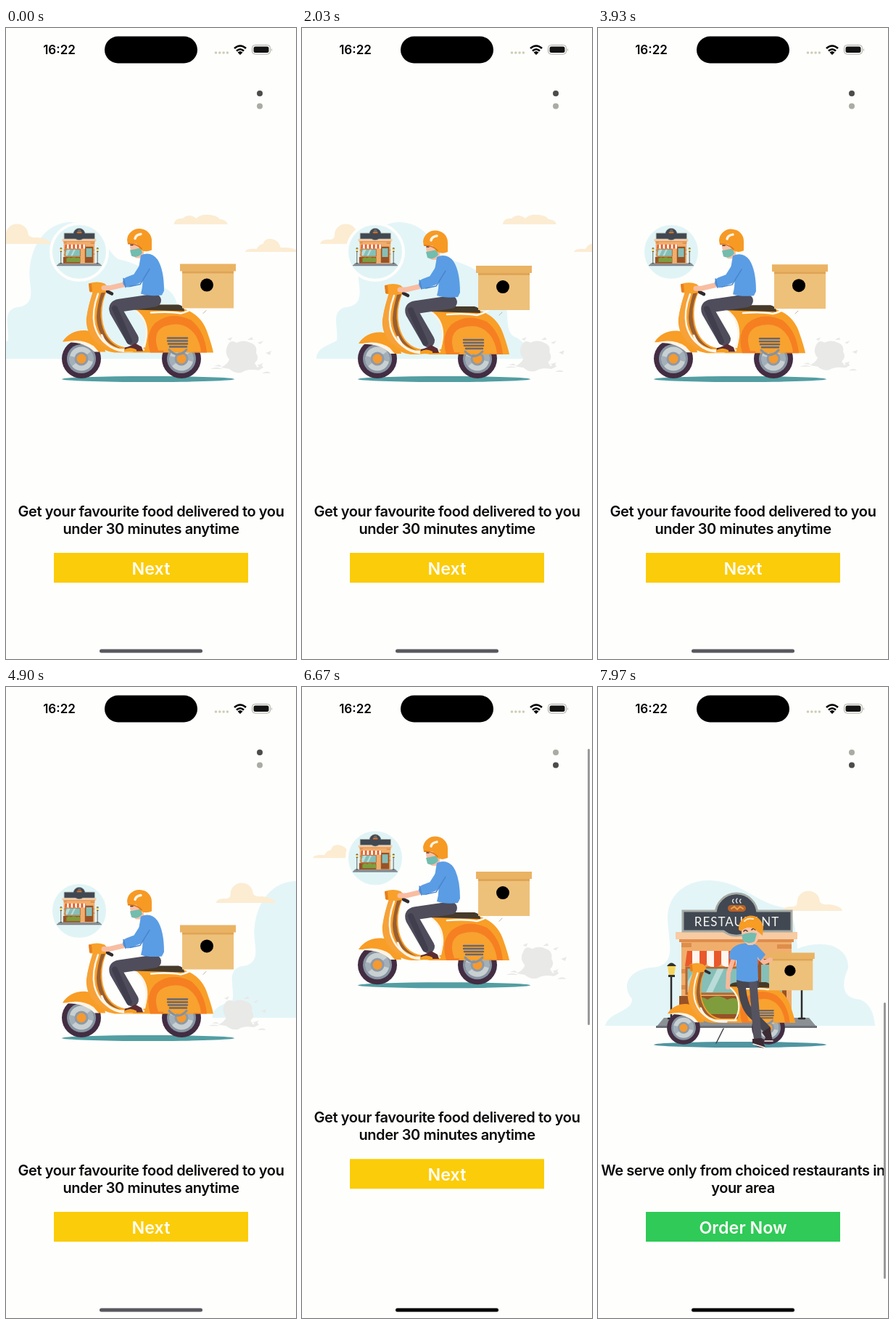
Animation of 400 by 868 pixels, one loop 8000 ms. Source, as an HTML page:

```html
<!DOCTYPE html>
<html lang="en">
<head>
<meta charset="utf-8">
<title>Food delivery onboarding</title>
<style>
  html, body { margin: 0; width: 100%; height: 100%; overflow: hidden; background: #fefefd; }
  svg { display: block; width: 100vw; height: 100vh; }
  text { font-family: Inter, "Open Sans", sans-serif; text-anchor: middle; }
  .caption { font-size: 20px; font-weight: 600; letter-spacing: -.4px; fill: #0a0a0a; }
  .button { font-size: 23.3px; font-weight: 600; fill: #fffdf8; }
  .cloud { fill: #fcecd2; }
  .hill { fill: #e3f5f7; }
  .line { fill: none; stroke-linecap: round; stroke-linejoin: round; }
</style>
</head>
<body>
<svg viewBox="0 0 400 868">
  <defs>
    <path id="cloudA" class="cloud" d="M-35 297Q-34 291-24 291Q-15 292-15 285A15.500 15 0 0 1 16 284Q18 289 28 288Q46 290 47 297Z"/>
    <path id="cloudB" class="cloud" d="M217 270Q218 261 229 262Q238 254 248 262Q253 256 266 257Q277 258 280 263Q290 264 291 270Z"/>
    <path id="cloudC" class="cloud" d="M315 308Q317 303 331 304Q335 297 340 297Q342 289 351 290Q361 291 364 302Q385 301 387 308Z"/>

    <pattern id="awning" x="120" width="20" height="30" patternUnits="userSpaceOnUse">
      <rect width="20" height="30" fill="#fff6ee"/><rect width="10" height="30" fill="#e8592c"/>
    </pattern>

    <g id="lamp">
      <path class="line" stroke="#2b2b2b" stroke-width="2.500" d="M101 398V456M97 456H105"/>
      <path fill="#f6d45a" d="M96 384H107L105 397H98Z"/>
      <path fill="#33322e" d="M95 384Q101 375 108 384ZM97 396H106V399H97Z"/>
    </g>

    <g id="store">
      <path fill="#8b9095" d="M91 455H291L302 468H80Z"/>
      <path fill="#6b7078" d="M80 466H302V469H80Z"/>
      <path fill="#f0ae6c" d="M115 346H267V456H115Z"/>
      <path fill="#de8d4c" d="M115 352h14v6h-14zM247 354h20v6h-20zM115 388h7v6h-7zM256 388h11v6h-11zM247 408h20v6h-20zM115 410h9v6h-9z"/>
      <path fill="#985225" d="M219 374H260V454H219ZM112 425H196V456H112Z"/>
      <path fill="#86bfb8" d="M225 382H254V425H225ZM122 386H196V422H122Z"/>
      <path fill="#b9dcd8" d="M134 387H148L133 420H122V408ZM165 387H174L158 420H149Z"/>
      <path fill="none" stroke="#b26831" stroke-width="3" d="M122 386H196V422H122Z"/>
      <path fill="#7f9d3c" d="M128 450V432Q140 422 151 430Q165 421 178 430Q192 424 196 436V450Z"/>
      <path fill="url(#awning)" d="M123 363H222V378Q222 385 215 385Q210 385 210 379Q210 385 200 385Q190 385 190 379Q190 385 180 385Q170 385 170 379Q170 385 160 385Q150 385 150 379Q150 385 140 385Q130 385 130 379Q129 385 120 384Z"/>
      <path fill="#f8cba2" d="M107 337H275V347H107Z"/>
      <path fill="#df8c4c" d="M112 347H270V351H112Z"/>
      <g fill="#414852" stroke="#a5aaa4" stroke-width="3">
        <circle cx="191" cy="313" r="29"/>
        <path d="M117 308H267V336H117Z"/>
      </g>
      <circle cx="191" cy="313" r="27.500" fill="#414852"/>
      <path d="M119 310H265V334H119Z" fill="#414852"/>
      <rect x="179" y="300" width="25" height="9" rx="4.500" fill="#b9622b"/>
      <path class="line" stroke="#e9a24a" stroke-width="2" d="M184 305L188 302L192 306L196 302L200 305"/>
      <path class="line" stroke="#eee" stroke-width="1.300" d="M187 297q-3-3 0-5M192 297q-3-3 0-6M197 297q-3-3 0-5"/>
      <use href="#lamp"/><use href="#lamp" x="180"/>
    </g>

    <g id="wheel">
      <circle r="27" fill="#432d42"/>
      <circle r="20" fill="#8794a2"/>
      <circle r="16.500" fill="#c9d0d2"/>
      <path fill="#a3afb8" d="M0 0L-13 10A16.500 16.500 0 0 1-16 -4ZM0 0L13-10A16.500 16.500 0 0 1 16 4Z"/>
      <circle r="9.500" fill="#8f9aa6"/>
      <circle r="6.500" fill="#f59a30"/>
    </g>
    <g id="wheels">
      <use href="#wheel" x="104" y="455"/>
      <use href="#wheel" x="242" y="455"/>
    </g>

    <g id="scooter">
      <path fill="#f89d26" d="M78 432C88 415 113 411 128 424Q136 434 137 446H127Q116 431 98 432Z"/>
      <path fill="#fff4e4" d="M78 433Q104 426 121 438L128 446H122Q107 431 78 433Z"/>
      <path fill="#f89f28" d="M120 362L139 362Q129 385 134 408Q141 436 165 440H192Q198 419 186 395Q180 390 178 387H246Q270 395 278 420Q284 437 286 447H150C125 444 109 421 111 399Q113 385 120 362Z"/>
      <path fill="#7a4a36" d="M131 365L137 364Q127 386 132 408Q138 433 158 441C135 436 125 417 125 397Q126 382 131 365Z" opacity=".75"/>
      <path fill="#f6a238" d="M120 365L129 364Q119 389 123 408Q128 430 147 442Q116 437 112 408Q110 390 120 365Z"/>
      <path class="line" stroke="#fff5e8" stroke-width="2.500" d="M127 366Q118 390 122 409Q129 436 156 443H190"/>
      <path class="line" stroke="#fff5e8" stroke-width="3" d="M132 423Q141 447 174 445"/>
      <path class="line" stroke="#fff5e8" stroke-width="2.500" d="M180 390Q194 401 194 420Q194 432 188 441"/>
      <path fill="#f67f22" d="M199 447Q191 421 206 406Q227 389 255 402Q274 417 277 447H259Q256 418 235 416Q217 418 217 447Z"/>
      <path fill="#f8a230" d="M210 444Q201 419 218 411Q247 401 262 424Q268 435 269 446Z"/>
      <path class="line" stroke="#68686f" stroke-width="2.500" d="M223 427H250M223 431H250M224 435H250M226 439H249"/>
      <path class="line" stroke="#8492a2" stroke-width="3" d="M225 443Q237 456 249 443"/>
      <path class="line" stroke="#fffaf4" stroke-width="2.500" d="M200 392Q226 390 241 393Q253 390 258 385"/>
      <path fill="#463a2a" d="M177 388Q181 380 196 381H238Q246 383 246 390Z"/>
      <path fill="#f8a02a" d="M114 352Q126 348 136 352L141 357L138 364H116Z"/>
      <path fill="#e87f1c" d="M114 352H118L119 363H115Z"/>
      <path class="line" stroke="#312b2e" stroke-width="4.500" d="M140 363L146 366"/>
    </g>

    <g id="box">
      <path fill="#eec17a" d="M243 333H314V386H243Z"/>
      <path fill="#dfa457" d="M243 335H314V338H243Z"/>
      <path fill="#eab363" d="M240 325H317V335H240Z"/>
      <circle cx="277" cy="354" r="9"/>
      <path class="line" stroke="#c9b090" d="M276 389L272 393"/>
    </g>

    <g id="helmet">
      <path fill="#f69a24" d="M-17-2A17 16 0 0 1 17-1V12Q8 16 1 11L-4 3L-16 4Z"/>
      <path class="line" stroke="#fff4e4" stroke-width="3.500" d="M2-10Q-5-9-6-4"/>
      <path class="line" stroke="#d97320" stroke-width="1.500" d="M-15 3Q-4 3 3 10"/>
    </g>

    <g id="rider">
      <path fill="#fac0a6" d="M171 296H190V317H179Q170 309 171 296Z"/>
      <path class="line" stroke="#4f4d5b" stroke-width="18" d="M205 375L157 382Q149 383 152 390L174 428"/>
      <path class="line" stroke="#413f4d" stroke-width="8" d="M150 386L170 431"/>
      <path fill="#5a2c34" d="M164 440Q173 438 178 434L187 439L189 445H163Z"/>
      <path fill="#f6a021" d="M163 443Q172 438 180 443V446H163Z"/>
      <path fill="#5a9de4" d="M186 313Q200 307 209 319Q218 333 218 362L215 368Q198 370 186 366Q192 344 183 331Z"/>
      <path class="line" stroke="#f8bda2" stroke-width="7" d="M164 353L143 358L135 358"/>
      <path class="line" stroke="#5a9de4" stroke-width="14" d="M195 323L181 345L168 350"/>
      <path class="line" stroke="#4a84cc" stroke-width="1.500" d="M198 332L185 353L171 356M162 345L165 357"/>
      <path fill="#72bdae" d="M171 306L186 303L188 310Q181 318 173 314Z"/>
      <path class="line" stroke="#4a342b" stroke-width="1.500" d="M172 299h3"/>
      <use href="#helmet" x="184" y="294"/>
    </g>

    <g id="server">
      <path class="line" stroke="#f7b89c" stroke-width="6" d="M187 374L180 393L179 413"/>
      <path fill="#48464f" d="M191 402H222V414H192Z"/>
      <path class="line" stroke="#48464f" stroke-width="11" d="M198 408Q200 438 211 449L233 471"/>
      <path class="line" stroke="#55535f" stroke-width="11" d="M214 408L217 445L220 481"/>
      <path fill="#3d2b34" d="M213 484L225 483L231 496Q222 498 213 490ZM226 475L237 468L241 487H229L231 482Z"/>
      <path class="line" stroke="#fff5ec" stroke-width="1.500" d="M214 491L230 496M230 487H241"/>
      <path class="line" stroke="#f7b89c" stroke-width="6" d="M221 371L229 379L238 375"/>
      <path fill="#5a9de4" d="M190 356Q204 349 219 355L231 368L224 377L220 371L221 404Q207 408 191 403V376L181 374Q180 361 190 356Z"/>
      <path fill="#f9c3a8" d="M198 330H222V342Q221 352 213 355H207Q199 350 198 339Z"/>
      <path fill="#72bdae" d="M198 341Q209 336 219 339L216 350Q207 355 200 349Z"/>
      <path class="line" stroke="#493428" stroke-width="1.500" d="M201 336q2-3 5 0M212 334q2-3 5 0M201 331l4-1M212 329l4 0"/>
      <path fill="#f79c24" d="M194 334A17 18 0 0 1 228 331L227 342L221 337Q209 325 197 336Z"/>
      <path class="line" stroke="#ffe5c0" stroke-width="2" d="M202 322Q207 317 214 319"/>
    </g>
  </defs>

  <rect width="400" height="868" fill="#fefefd"/>

  <g id="pages">
    <g>
      <g id="scenery"></g>
      <circle cx="101" cy="308" r="39" fill="#e1f4f5" stroke="#fefefd" stroke-width="4"/>
      <use href="#store" transform="translate(47.500 196) scale(.28)"/>
      <ellipse cx="196" cy="483" rx="119" ry="4" fill="#539ea2"/>
      <g id="smoke" fill="#e9e9e8">
        <path d="M306 436Q310 428 318 433Q328 428 337 433Q347 436 345 447Q350 455 343 461L349 471Q333 468 325 474Q316 476 308 469L297 467Q306 462 308 456Q300 447 306 436Z"/>
        <path d="M282 469q8-4 17 0zM287 465l7-2 4 3zM343 470l9-7 3 4 -5 3zM353 475q8-5 12 0zM346 464l9 -3 -4 5zM358 447l8-3-2 6zM347 433l8-3-4 5zM305 428l7-3-2 5zM333 429l6-4 2 4z"/>
      </g>
      <use href="#wheels"/>
      <g id="ride">
        <use href="#scooter"/><use href="#box"/><use href="#rider"/>
      </g>
      <text class="caption" x="200" y="672">Get your favourite food delivered to you</text>
      <text class="caption" x="200" y="696">under 30 minutes anytime</text>
      <path fill="#fbcc09" d="M66 722H334V763H66Z"/>
      <text class="button" x="200" y="752">Next</text>
    </g>

    <g transform="translate(0 868)">
      <path class="hill" d="M10 466C14 447 48 447 47 429C31 411 43 389 73 386C111 384 97 352 96 318C96 283 125 265 155 266C202 269 214 296 258 304Q272 310 275 360Q300 350 323 356Q346 365 345 387C334 411 338 429 362 430Q380 438 382 466Z"/>
      <g id="clouds">
        <use id="cloudLow" href="#cloudA"/>
        <g id="cloudPair"><use href="#cloudB" x="-221" y="-16"/><use href="#cloudC" x="-257"/></g>
      </g>
      <use href="#store"/>
      <text x="191.500" y="329" fill="#f6f6f2" style="font-family:Lato,sans-serif;font-size:17px;letter-spacing:1px">RESTAURANT</text>
      <ellipse cx="196" cy="492" rx="119" ry="4" fill="#4f95a0"/>
      <path class="line" stroke="#484349" stroke-width="1.500" d="M173 470L163 490"/>
      <g transform="translate(29.800 83) scale(.848)"><use href="#wheels"/><use href="#scooter"/></g>
      <use href="#box" transform="translate(30 90) scale(.848)"/>
      <use href="#server"/>
      <text class="caption" x="200" y="672">We serve only from choiced restaurants in</text>
      <text class="caption" x="200" y="696">your area</text>
      <path fill="#2fca58" d="M66 722H334V763H66Z"/>
      <text class="button" x="200" y="752">Order Now</text>
    </g>
  </g>

  <text x="73.500" y="36" style="font-size:17px;font-weight:600">16:22</text>
  <rect x="136" y="11.500" width="128" height="37" rx="18.500"/>
  <g fill="#cfccb4">
    <circle cx="289.500" cy="34" r="1.800"/><circle cx="294.800" cy="34" r="1.800"/>
    <circle cx="300.100" cy="34" r="1.800"/><circle cx="305.400" cy="34" r="1.800"/>
  </g>
  <path class="line" stroke="#000" stroke-width="2.600" style="stroke-linecap:butt" d="M315 28Q323 21 331 28M318 31.500Q323 27 328 31.500"/>
  <path d="M319.500 33.500Q323 30.500 326.500 33.500L323 37Z"/>
  <rect x="339.500" y="23.500" width="25" height="12.500" rx="4" fill="none" stroke="#a9a99e"/>
  <rect x="341.500" y="25.500" width="21" height="8.500" rx="2.500" fill="#141414"/>
  <path d="M366 28Q368 30 366 32Z" fill="#a9a99e"/>
  <circle id="dot0" cx="350" cy="90" r="4"/><circle id="dot1" cx="350" cy="107.500" r="4"/>
  <rect id="bar" x="394" width="3" height="380" rx="1.500" fill="#999"/>
  <rect id="home" x="129" y="854.500" width="142" height="5" rx="2.500"/>
</svg>

<script>
const $ = id => document.getElementById(id);
const move = (node, x, y) => node.setAttribute('transform', `translate(${x} ${y})`);
const clamp01 = v => Math.min(1, Math.max(0, v));
const smooth = (t, from, to) => { const s = clamp01((t - from) / (to - from)); return s * s * (3 - 2 * s); };
const TAU = 2 * Math.PI, LOOP = 8, PAGE = 868, SPEED = 353;

// Each pass of hill and clouds: x position at a known second.
const passes = [[15, 0], [378, 1.13], [325, 4.9]];
const passNodes = passes.map(() => {
  const g = document.createElementNS('http://www.w3.org/2000/svg', 'g');
  g.innerHTML = `<path class="hill" transform="translate(-12 0)" d="M-28 455C-28 440-12 437 0 430C3 414-10 387 14 384C43 379 27 352 30 332C33 295 55 267 88 267C129 270 132 303 152 318C183 325 204 337 217 358C248 374 224 418 248 426Q263 434 266 455Z"/>
    <use href="#cloudA"/><use href="#cloudB"/><use href="#cloudC"/>`;
  return $('scenery').appendChild(g);
});

function draw(t) {
  passes.forEach(([x, at], i) => {
    const px = x - SPEED * (t - at);
    passNodes[i].setAttribute('visibility', px > -430 && px < 450 ? 'visible' : 'hidden');
    move(passNodes[i], px, 0);
  });

  move($('ride'), 0, 0.4 - 2 * Math.cos(TAU * (t - 2.93) / 0.565));
  const puff = (1 - Math.cos(TAU * t / 0.733)) / 2;
  $('smoke').setAttribute('transform',
    `translate(${-5 * puff} ${-4 * puff}) translate(290 470) scale(${1 - .06 * puff} ${1 - .1 * puff}) translate(-290 -470)`);

  const firstVisit = t < 7.1;
  move($('clouds'), -150 * (t - (firstVisit ? 6.07 : 7.97)), 0);
  move($('cloudLow'), firstVisit ? -10 : 290, 11);
  $('cloudPair').setAttribute('visibility', firstVisit ? 'visible' : 'hidden');

  const scroll = PAGE * (smooth(t, 5.25, 5.8) - smooth(t, 6.2, 6.773) + smooth(t, 7.52, 7.93));
  move($('pages'), 0, -scroll);
  $('bar').setAttribute('y', 53 + 0.439 * scroll);
  $('bar').setAttribute('opacity', smooth(t, 5.2, 5.3) - smooth(t, 7.1, 7.35) + smooth(t, 7.48, 7.56));

  const second = (t > 5.78 && t < 6.78) || t > 7.9;
  $('dot0').setAttribute('fill', second ? '#ababa4' : '#4c4c4a');
  $('dot1').setAttribute('fill', second ? '#4c4c4a' : '#ababa4');
  $('home').setAttribute('fill', t < 6.25 ? '#59585e' : '#000');
}

const start = performance.now();
(function tick() {
  draw((performance.now() - start) / 1000 % LOOP);
  requestAnimationFrame(tick);
})();
</script>
</body>
</html>
```
